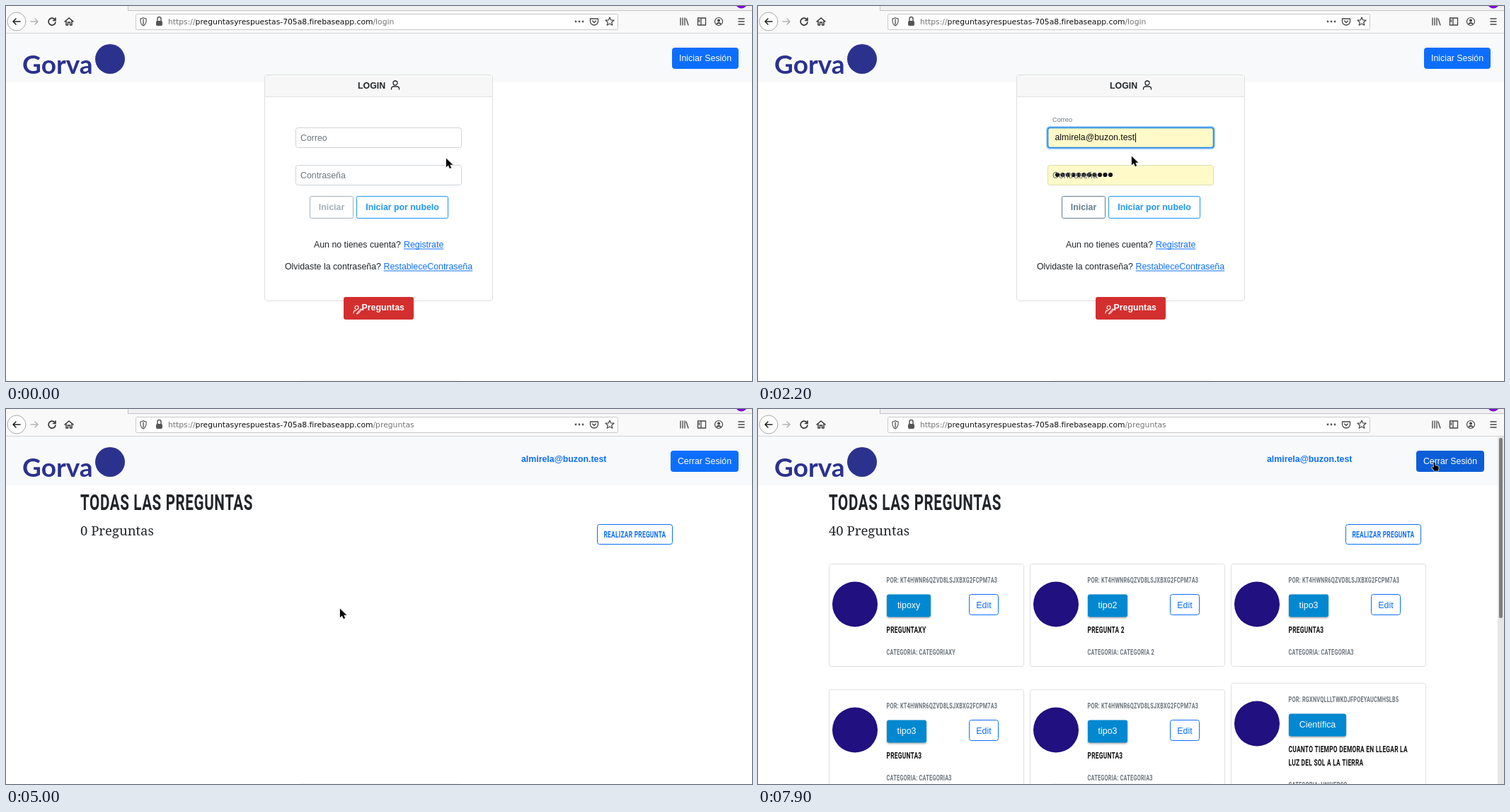
These frames come from a looping animation (1054x531 px, 8000 ms). An HTML page with a canvas:

```html
<!DOCTYPE html>
<html lang="es">
<head>
<meta charset="utf-8">
<title>Preguntas y respuestas</title>
<style>
html, body { margin: 0; width: 100%; height: 100%; overflow: hidden; background: #fff; }
canvas { display: block; }
</style>
</head>
<body>
<canvas id="stage" width="1054" height="531"></canvas>
<script>
const ctx = document.getElementById('stage').getContext('2d');
const LOOP = 8000, STEP = 100;
const EMAIL = 'almirela@buzon.test';
const ID_A = 'KT4HWNR6QZVD8LSJXBXG2FCPM7A3', ID_B = 'RGXNVQLLLTWKDJFPOEYAUCMHSLB5';
const BLUE = '#0d6efd', GREY = '#6c757d', INK = '#212529', NAVY = '#2b328d';
const SANS = '"Liberation Sans", Arial, sans-serif';
const UI = '"DejaVu Sans", sans-serif';
const BODY = '12.35px ' + SANS, BOLD = 'bold ' + BODY;

// time, x, y, pointer kind (arrow, beam, hand)
const POINTER = [
  [0, 622, 216, 'arrow'], [300, 622, 216, 'arrow'], [500, 590, 194, 'beam'], [600, 572, 187, 'beam'],
  [1400, 572, 187, 'beam'], [1500, 562, 183, 'arrow'], [2000, 528, 213, 'arrow'], [2200, 528, 213, 'arrow'],
  [2300, 513, 212, 'arrow'], [2800, 513, 212, 'arrow'], [3100, 535, 235, 'beam'], [3300, 560, 256, 'arrow'],
  [3500, 555, 280, 'hand'], [3700, 520, 287, 'hand'], [3900, 471, 285, 'hand'], [4900, 471, 285, 'hand'],
  [5000, 472, 283, 'arrow'], [5100, 472, 283, 'arrow'], [5200, 471, 281, 'arrow'], [5500, 471, 281, 'hand'],
  [6100, 471, 281, 'hand'], [6200, 510, 267, 'arrow'], [6500, 722, 190, 'arrow'], [6600, 722, 190, 'arrow'],
  [7100, 938, 64, 'hand'], [7200, 938, 64, 'hand'], [7500, 958, 75, 'hand'], [7600, 958, 75, 'hand'],
  [7700, 956, 75, 'hand'], [7800, 956, 75, 'hand'], [7900, 952, 75, 'hand']
];

const clamp = v => Math.max(0, Math.min(1, v));
const mix = (a, b, p) => a + (b - a) * p;

function text(str, x, y, color = INK, font = BODY, align = 'left') {
  ctx.font = font;
  ctx.fillStyle = color;
  ctx.textAlign = align;
  ctx.fillText(str, x, y);
  return ctx.measureText(str).width;
}

// One narrow, slightly spaced display face for headings and card labels
function condensed(str, x, y, size, color = INK, align = 'left') {
  ctx.save();
  ctx.translate(x, y);
  ctx.scale(0.66, 1);
  ctx.letterSpacing = size * 0.03 + 'px';
  text(str.toUpperCase(), 0, 0, color, `bold ${size}px Roboto, sans-serif`, align);
  ctx.restore();
}

function fill(x, y, w, h, color) {
  ctx.fillStyle = color;
  ctx.fillRect(x, y, w, h);
}

// Bordered boxes put the line on pixel centres; plain ones fill to the edge
function box(x, y, w, h, bg, border, r = 3, line = 1) {
  const inset = border ? 0.5 : 0;
  ctx.beginPath();
  ctx.roundRect(x + inset, y + inset, w - 2 * inset, h - 2 * inset, r);
  if (bg) { ctx.fillStyle = bg; ctx.fill(); }
  if (border) { ctx.strokeStyle = border; ctx.lineWidth = line; ctx.stroke(); }
}

function disc(x, y, r, color) {
  ctx.fillStyle = color;
  ctx.beginPath();
  ctx.arc(x, y, r, 0, 7);
  ctx.fill();
}

function icon(path, x, y, color = '#333', width = 1.4, bg) {
  const p = new Path2D(path);
  ctx.save();
  ctx.translate(x, y);
  if (bg) { ctx.fillStyle = bg; ctx.fill(p); }
  ctx.strokeStyle = color;
  ctx.lineWidth = width;
  ctx.lineCap = ctx.lineJoin = 'round';
  ctx.stroke(p);
  ctx.restore();
}

function link(str, x, y) {
  const w = text(str, x, y, BLUE);
  fill(x, y + 1.5, w, 1, BLUE);
}

function browser(path) {
  fill(0, 0, 1054, 39, '#f9f9fa');
  fill(172, 0, 882, 6, '#f0f0f1');
  fill(172, 6, 882, 1, '#c6c6c8');
  fill(172, 0, 1, 6, '#c6c6c8');
  fill(0, 38, 1054, 1, '#d3d3d5');
  disc(1039, -5, 8.5, '#8000d7');

  disc(15, 22, 13, '#fff');
  icon('M13 0A13 13 0 1 1-13 0A13 13 0 1 1 13 0', 15, 22, '#a9a9ab', 1);
  icon('M5 0H-5M-1-4L-5 0L-1 4', 15, 22, '#222', 1.6);
  icon('M-5 0H5M1-4L5 0L1 4', 40, 22, '#b5b5b7', 1.6);
  icon('M4-3A5 5 0 1 0 5 1M5-5V-1.5H1.5', 65, 22, '#333', 1.6);
  icon('M-6 0L0-5L6 0M-4-1V5H-1.500V1H1.500V5H4V-1', 89, 22, '#333', 1.5);

  box(183, 11, 682, 23, '#fff', '#c8c8ca', 2);
  icon('M-4-4Q-2-4 0-5.500Q2-4 4-4Q5 3 0 6Q-5 3-4-4', 194, 22, '#666', 1.3);
  icon('M0-3V4', 194, 22, '#666', 1.5);
  box(212, 21, 9, 7, '#555', '#555', 1);
  icon('M-2.500 0V-3A2.500 2.500 0 0 1 2.500-3V0', 216.5, 21, '#555', 1.5);

  const font = '10.78px ' + UI;
  let x = 229;
  x += text('https://', x, 26, '#737373', font);
  x += text('preguntasyrespuestas-705a8.firebaseapp.com', x, 26, '#0c0c0d', font);
  text(path, x, 26, '#737373', font);

  for (const dx of [-5, 0, 5]) disc(810 + dx, 22, 1.4, '#555');
  icon('M-5.500-4H5.500V0A5.500 5 0 0 1-5.500 0ZM-2.500-1L0 1.500L2.500-1', 831, 22, '#444', 1.3);
  icon('M0-6L1.700-2L6-1.800L2.700 1L3.800 5.200L0 3L-3.800 5.200L-2.700 1L-6-1.800L-1.700-2Z', 853, 22, '#444', 1.2);
  icon('M-5-5V5M-2-5V5M1-5V5M3-4L6 5', 958, 22, '#444', 1.3);
  icon('M-5.500-5H5.500V5H-5.500ZM-1-5V5M-4-2H-3M-4 0H-3', 983, 22, '#444', 1.3);
  icon('M5.500 0A5.500 5.500 0 1 1-5.500 0A5.500 5.500 0 1 1 5.500 0', 1007, 22, '#444', 1.2);
  disc(1007, 20.5, 2, '#444');
  icon('M-2.500 3Q0 1 2.500 3', 1007, 22, '#444', 2);
  icon('M-4-4H4M-4 0H4M-4 4H4', 1039, 22, '#444', 1.5);
}

function brand() {
  fill(0, 39, 1054, 69, '#f8f9fa');
  text('Gorva', 23, 96, NAVY, 'bold 37px Lato, sans-serif');
  disc(147, 75, 21, NAVY);
}

function field(top, filled, focused, hovered) {
  if (focused) box(408, top - 1, 237, 31, null, '#9fcbf6', 4, 3);
  box(409, top, 235, 29, filled ? '#fffac8' : '#fff',
    focused ? '#1c86e0' : hovered ? '#a3abb3' : filled ? '#dedcb8' : '#ced4da', 3, focused ? 1.6 : 1);
}

function floatLabel(str, top, p) {
  text(str, 416, mix(top + 19, top - 8, p), GREY, `${mix(12.35, 9.2, p)}px ${SANS}`);
}

function outlined(str, x, y, w, color, bg = '#fff') {
  box(x, y, w, 32, bg, color, 2);
  text(str, x + w / 2, y + 19.5, color, BOLD, 'center');
}

function popup(hovered) {
  const font = '10.26px ' + UI;
  box(409, 202, 234, 64, '#fff', '#bdbdbd', 0);
  if (hovered) fill(410, 203, 232, 34, '#e4e4e6');
  fill(410, 237, 232, 28, '#ebebeb');
  fill(410, 237, 232, 1, '#c9c9c9');
  icon('M6 0H0M1 0V2M3 0V1.500M11 0A2.300 2.300 0 1 1 6.400 0A2.300 2.300 0 1 1 11 0', 415, 212, '#777', 1.3);
  text(EMAIL, 430, 216, '#111', font);
  text('From this website', 430, 231, '#6b6b6b', font);
  text('View Saved Logins', 525.5, 255, '#111', font, 'center');
}

function person(x, y) {
  icon('M3-3A3 3 0 1 1-3-3A3 3 0 1 1 3-3M-5.500 6V5Q-5.500 2-2 2H2Q5.500 2 5.500 5V6', x, y, INK, 1.3);
}

function spinner(t) {
  ctx.save();
  ctx.translate(556, 111);
  ctx.rotate((t - 4500) / 1000 * Math.PI * 2);
  ctx.strokeStyle = '#d32f2f';
  ctx.lineWidth = 2.6;
  ctx.beginPath();
  ctx.arc(0, -1, 7, 0.35, Math.PI - 0.35);
  ctx.stroke();
  ctx.restore();
}

function loginPage(t) {
  const loading = t >= 4200, filled = t >= 2200, clicked = t >= 4100;
  const focused = t >= 900 && !clicked;
  const row = y => Math.round(y + (loading ? 1.3 : 0));

  brand();
  box(941, 59, 94, 30, BLUE, BLUE);
  text('Iniciar Sesión', 988, 78, '#fff', BODY, 'center');

  const headBottom = loading ? 130 : 128;
  box(365, loading ? 96 : 97, 323, loading ? 324 : 321, '#fff', '#dfdfdf');
  fill(366, 98, 321, headBottom - 98, '#f7f7f7');
  fill(366, headBottom, 321, 1, '#dfdfdf');
  const shift = loading ? 38.5 : 0;
  text('LOGIN', 497 - shift, row(117), INK, BOLD);
  person(550 - shift, row(112));
  if (loading) spinner(t);

  const mail = row(172.3), pass = row(224.8);
  field(mail, filled, focused, t >= 500 && t < 900);
  field(pass, filled, false, t >= 3000 && t < 3300);
  floatLabel('Correo', mail, clamp((t - 900) / 200));
  if (filled) {
    const w = text(EMAIL, 419.5, mail + 18, '#111');
    if (focused && (t < 2900 || t >= 3400)) fill(420 + Math.round(w), mail + 8, 1, 13, '#111');
    for (let i = 0; i < 11; i++) disc(423 + i * 7.5, pass + 14, 3.1, '#111');
  } else if (focused) {
    fill(419, mail + 8, 1, 13, '#111');
  }
  floatLabel('Contraseña', pass, clamp((t - 2200) / 200));

  const y = row(269.3);
  const overStart = t >= 3800, overOther = t >= 3500 && t < 3800;
  if (clicked) box(428, y - 1, 64, 34, null, '#bcc6cc', 3, 3);
  outlined('Iniciar', 429, y, 62, filled ? '#607d8b' : '#a5b1ba', overStart ? '#f4f6f7' : '#fff');
  outlined('Iniciar por nubelo', 495, y, 130, '#2196f3', overOther ? '#eff7fe' : '#fff');

  text('Aun no tienes cuenta?', 435, row(342));
  link('Registrate', 562, row(342));
  text('Olvidaste la contraseña?', 394, row(373));
  link('RestableceContraseña', 533.5, row(373));

  box(477, 412, 99, 32, '#d32f2f', '#d32f2f', 2);
  icon('M7-3A2.500 2.500 0 1 1 2-3A2.500 2.500 0 1 1 7-3M0 5Q0 1 4 1M5 5L10-1L11.500 0L6.500 5.500L4.500 6Z', 491, 430, '#fff', 1.1);
  text('Preguntas', 502.5, 431, '#fff', BOLD);

  if (t >= 1000 && t < 2200) popup(t >= 1800);
}

function card({ x, y, h = 146, id = ID_A, type, w = 56, title, category, edit = true }, avatars, hovered) {
  const left = x + 81.5;
  box(x, y, 276, h, '#fff', '#dfdfdf');
  if (avatars) disc(x + 37, y + 57.5, 32, '#21107f');
  condensed('Por: ' + id, left, y + 27, 11.1, GREY);
  ctx.save();
  ctx.shadowColor = 'rgba(0,0,0,.35)';
  ctx.shadowBlur = 3;
  ctx.shadowOffsetY = 1.5;
  box(x + 82, y + 43.5, w, 32, hovered ? '#0277bd' : '#0288d1', null, 3);
  ctx.restore();
  text(type, x + 82 + w / 2, y + 63, '#fff', BODY, 'center');
  if (edit) {
    box(x + 198, y + 43, 42, 30, '#fff', BLUE);
    text('Edit', x + 219, y + 63, BLUE, BODY, 'center');
  }
  title.forEach((line, i) => condensed(line, left, y + 98 + i * 18.5, 12.7, '#111'));
  condensed('Categoria: ' + category, left, y + 110.5 + title.length * 18.5, 11.1, GREY);
}

const CARDS = [
  { x: 100, y: 219, type: 'tipoxy', w: 62, title: ['PreguntaXY'], category: 'categoriaXY' },
  { x: 384, y: 219, type: 'tipo2', title: ['Pregunta 2'], category: 'categoria 2' },
  { x: 668, y: 219, type: 'tipo3', title: ['Pregunta3'], category: 'categoria3' },
  { x: 100, y: 397, type: 'tipo3', title: ['Pregunta3'], category: 'categoria3' },
  { x: 384, y: 397, type: 'tipo3', title: ['Pregunta3'], category: 'categoria3' },
  { x: 668, y: 388, h: 170, id: ID_B, type: 'Científica', w: 81, edit: false, category: 'universo',
    title: ['Cuanto tiempo demora en llegar la', 'luz del sol a la tierra'] }
];

function questionsPage(t) {
  const loaded = t >= 5500;
  const right = loaded ? 0 : 9, mid = loaded ? 0 : 5;
  const hover = clamp((t - 7000) / 200);

  brand();
  text(EMAIL, 719 + right, 75, BLUE, BOLD);
  const color = `rgb(${mix(13, 11, hover)},${mix(110, 94, hover)},${mix(253, 215, hover)})`;
  box(930 + right, 59, 96, 30, color, color);
  text('Cerrar Sesión', 978 + right, 78, '#fff', BODY, 'center');

  condensed('Todas las preguntas', 100 + mid, 142.5, 31.2);
  text(`${loaded ? 40 : 0} Preguntas`, 100 + mid, 179, INK, '18.5px "Noto Serif", serif');
  box(830 + mid, 163, 107, 29, '#fff', BLUE);
  condensed('Realizar pregunta', 883.5 + mid, 182, 12.7, BLUE, 'center');
  if (!loaded) return;

  CARDS.forEach((c, i) => card(c, t >= 5600, i === 1 && t < 6700));
  fill(1045, 39, 9, 492, '#e6e6e6');
  box(1047, 41, 5, 255, '#7d7d7d', null, 2);
}

const SHAPES = {
  arrow: 'M0 0V12L2.900 9.400L5 14L7 13.100L5 8.700H9Z',
  hand: 'M2.500 1Q4-.500 4.500 1.500V5L8.500 6Q10 6.500 9.700 8L9 12.500H3.500L.500 8.500Q0 7 1.500 7.200L2.800 8Z'
};

function pointer(t) {
  let i = POINTER.length - 1;
  while (POINTER[i][0] > t) i--;
  const a = POINTER[i], b = POINTER[i + 1] || a;
  const p = a === b ? 0 : (t - a[0]) / (b[0] - a[0]);
  const x = mix(a[1], b[1], p), y = mix(a[2], b[2], p);
  if (a[3] === 'beam') {
    const beam = 'M-2-6H2M0-6V6M-2 6H2';
    icon(beam, x, y, '#fff', 2.5);
    icon(beam, x, y, '#111', 1);
  } else {
    icon(SHAPES[a[3]], x, y, '#fff', 1.6);
    icon(SHAPES[a[3]], x, y, '#000', 0.3, '#000');
  }
}

function draw(now) {
  const t = Math.floor(now % LOOP / STEP) * STEP;
  const login = t < 4700;
  fill(0, 0, 1054, 531, '#fff');
  (login ? loginPage : questionsPage)(t);
  browser(login ? '/login' : '/preguntas');
  fill(415, 530, 225, 1, 'rgba(0,0,0,.04)');
  pointer(t);
  requestAnimationFrame(draw);
}
requestAnimationFrame(draw);
</script>
</body>
</html>
```
